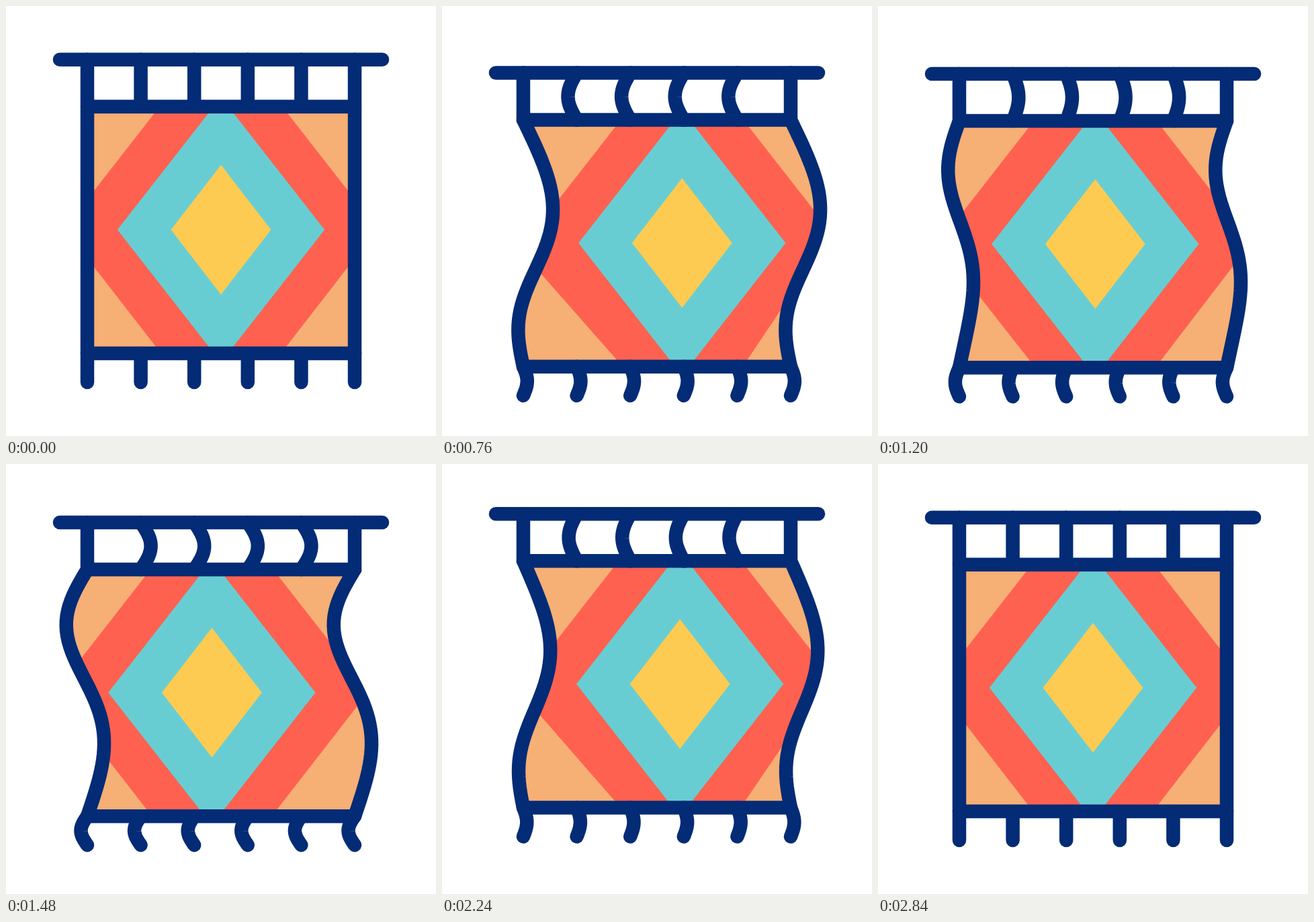
Recreate the animation shown at these times as an HTML page with a canvas. Size 640 px wide and 640 px high, loop 3000 ms.

```html
<!DOCTYPE html>
<html lang="en">
<head>
<meta charset="utf-8">
<title>Waving tapestry</title>
<style>
  html, body { margin: 0; width: 100%; height: 100%; overflow: hidden; background: #fff; }
  canvas { display: block; }
</style>
</head>
<body>
<canvas id="stage" width="640" height="640"></canvas>
<script>
const ctx = document.getElementById('stage').getContext('2d');
const LOOP = 3000, STEP = 40;
const NAVY = '#042b75', RED = '#ff6150', TEAL = '#68cdd2', YELLOW = '#fdcb52', ORANGE = '#f6af75';
const CENTER = 320, LEFT = 121, RIGHT = 519, GAP = (RIGHT - LEFT) / 5;
const ROD = 79.8, TOP = 149.8, BOTTOM = 517, TIP = 560;

// Each pose gives the sine harmonics that bend the tabs, the fringe and the cloth edges.
const rest = { tab: [0], fringe: [0], edge: [0, 0, 0] };
const blownRight = { tab: [-13.5], fringe: [6], edge: [31, 21, -5] };
const blownLeft = { tab: [15], fringe: [-9.5], edge: [0.7, -27.5, -5.4] };

const poseKeys = [[120, rest], [840, blownRight], [1362, blownLeft], [1560, blownLeft],
  [2105, blownRight], [2720, rest]];
const driftKeys = [[120, 0], [820, 38], [1445, -14], [2090, 38], [2820, 0]];
const bobKeys = [[120, 0], [1020, 24.5], [1900, -7.8], [2820, 0]];

// The two keys around time t and the eased progress between them.
function segment(keys, t) {
  const i = keys.findIndex(([time]) => time > t);
  if (i === 0) return [keys[0][1], keys[0][1], 0];
  if (i < 0) return [keys.at(-1)[1], keys.at(-1)[1], 0];
  const [t0, from] = keys[i - 1], [t1, to] = keys[i];
  return [from, to, (1 - Math.cos(Math.PI * (t - t0) / (t1 - t0))) / 2];
}

const mix = (a, b, k) => a + (b - a) * k;
const tween = (keys, t) => mix(...segment(keys, t));

function poseAt(t) {
  const [from, to, k] = segment(poseKeys, t);
  const blend = part => from[part].map((v, i) => mix(v, to[part][i], k));
  return { tab: blend('tab'), fringe: blend('fringe'), edge: blend('edge') };
}

// Points of a strand hanging from (x, y0) to (x, y1), bent by the given harmonics.
function strand(x, y0, y1, harmonics, count = 48) {
  return Array.from({ length: count + 1 }, (_, i) => {
    const u = i / count;
    const bend = harmonics.reduce((sum, h, n) => sum + h * Math.sin((n + 1) * Math.PI * u), 0);
    return [x + bend, mix(y0, y1, u)];
  });
}

function trace(points) {
  ctx.beginPath();
  points.forEach(p => ctx.lineTo(...p));
}

function stroke(points) {
  trace(points);
  ctx.stroke();
}

function fill(color, points) {
  ctx.fillStyle = color;
  trace(points);
  ctx.fill();
}

const bar = (x0, x1, y) => stroke([[x0, y], [x1, y]]);

const diamond = (color, w, h) => fill(color,
  [[CENTER - w, 333], [CENTER, 333 - h], [CENTER + w, 333], [CENTER, 333 + h]]);

// Corner patch on one side (-1 or 1) whose slanted edge passes through (x, y).
function corner(side, x, y, slope, height) {
  const at = dy => [x + slope * dy, y + dy];
  const outer = CENTER + side * 400;
  fill(ORANGE, [at(-height / 8), at(height), [outer, y + height], [outer, y - height / 8]]);
}

function drawCloth(left, right, drift) {
  const pull = Math.max(drift, 0);
  ctx.save();
  trace([...left, ...[...right].reverse()]);
  ctx.clip();
  ctx.fillStyle = RED;
  ctx.fillRect(0, TOP, 640, BOTTOM - TOP);
  ctx.translate(drift, 0);
  for (const side of [-1, 1]) {
    corner(side, CENTER + side * 99.3, 160, side * .781, 168);
    corner(side, CENTER + side * 97, 507, .0028 * pull - side * .776, -168);
  }
  diamond(TEAL, 154.2, 197.3);
  diamond(YELLOW, 74.5, 96.5);
  ctx.restore();
}

function draw(t) {
  const { tab, fringe, edge } = poseAt(t);
  const left = strand(LEFT, TOP, BOTTOM, edge);
  const right = strand(RIGHT, TOP, BOTTOM, edge);

  ctx.clearRect(0, 0, 640, 640);
  ctx.save();
  ctx.translate(0, tween(bobKeys, t));
  drawCloth(left, right, tween(driftKeys, t));

  ctx.strokeStyle = NAVY;
  ctx.lineWidth = 20.5;
  ctx.lineCap = 'round';
  ctx.lineJoin = 'miter';
  bar(80, 560, ROD);
  bar(LEFT, RIGHT, TOP);
  bar(LEFT, RIGHT, BOTTOM);
  stroke([[LEFT, ROD], ...left]);
  stroke([[RIGHT, ROD], ...right]);
  for (let i = 0; i < 6; i++) {
    const x = LEFT + i * GAP;
    if (i > 0 && i < 5) stroke(strand(x, ROD, TOP, tab));
    stroke(strand(x, BOTTOM, TIP, fringe));
  }
  ctx.restore();
}

function frame(now) {
  draw(Math.floor((now % LOOP) / STEP + .01) * STEP);
  requestAnimationFrame(frame);
}
draw(0);
requestAnimationFrame(frame);
</script>
</body>
</html>
```
